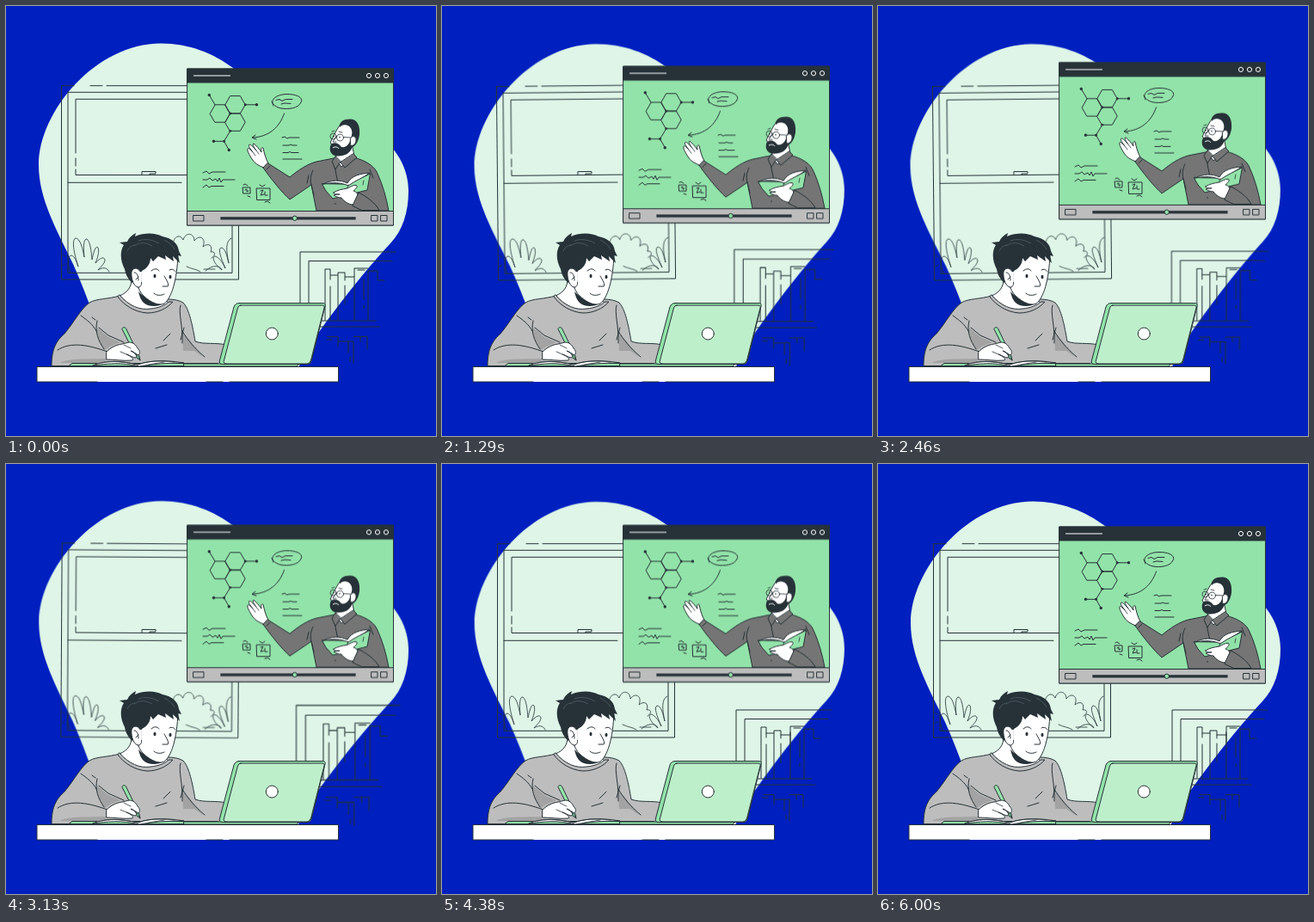
Animation of 500x500 px, one loop 6.04 s. Source, as an HTML page:

```html
<!DOCTYPE html>
<html lang="en">
<head>
<meta charset="utf-8">
<title>Online lesson</title>
<style>
  html, body { margin: 0; width: 100%; height: 100%; overflow: hidden; background: #001fbf; }
  svg { display: block; width: 100vw; height: 100vh; }
  .line { fill: none; stroke: #263238; stroke-width: 1; stroke-linecap: round; stroke-linejoin: round; }
  .thin { stroke-width: .8; }
  .ink { stroke: #263238; stroke-width: 1; stroke-linejoin: round; stroke-linecap: round; }
  .dark { fill: #263238; }
  .white { fill: #fff; }
  .green { fill: #92e3a9; }
  .pale { fill: #beefcb; }
  .grey { fill: #bdbdbd; }
  .shade { fill: #a3a3a3; }
  .suit { fill: #757575; }

  #blob, #window, #shelf, #screen { animation: 6040ms linear infinite; }
  #blob { transform-origin: 253px 230px; animation-name: sway; }
  #window { transform-origin: 168px 206px; animation-name: settle; }
  #shelf { transform-origin: 395px 350px; animation-name: beat; }
  #screen { animation-name: float; }

  /* 1.5 s cycles inside the 6.04 s loop */
  @keyframes float {
    0%, 24.834%, 49.669%, 74.503%, 99.338%, 100% { transform: translateY(0); }
    12.417%, 37.252%, 62.086%, 86.921% { transform: translateY(-10px); }
  }
  @keyframes sway {
    0%, 99.338%, 100% { transform: rotate(0deg); }
    6.209%, 31.043%, 55.877%, 80.712% { transform: rotate(1deg); }
    18.626%, 43.461%, 68.295%, 93.129% { transform: rotate(-1deg); }
  }
  @keyframes settle {
    0%, 57%, 100% { transform: rotate(0deg); }
    6.209%, 31.043% { transform: rotate(1deg); }
    18.626%, 43.461% { transform: rotate(-1deg); }
    51.82% { transform: rotate(.35deg); }
  }
  @keyframes beat {
    0%, 49.67%, 57%, 100% { transform: scale(1); }
    2.48% { transform: scale(1.1); }
    11.09% { transform: scale(1.075); }
    21.36% { transform: scale(1.042); }
    31.79% { transform: scale(1.02); }
    40.73% { transform: scale(1.012); }
    51.82% { transform: scale(1.085); }
    52.5% { transform: scale(1.07); }
  }
</style>
</head>
<body>
<svg viewBox="0 0 500 500">
  <defs>
    <path id="hex" class="line" d="M-11.7 0L-5.85 -10.2H5.85L11.7 0L5.85 10.2H-5.85Z"/>
  </defs>

  <path id="blob" fill="#def5e7" d="M180 43.500C213 43.500 241 55 264 72C318 108 385 125 425 146C455 162 468 190 468 215C468 240 461 261 447 276C422 303 398 332 361 383L340 420H122C110 382 95 338 78 300C60 262 38 225 38 185C38 123 104 43.500 180 43.500Z"/>

  <g id="window" class="line">
    <path d="M64.5 92.700H79M98 92.700H112M117 92.700H240M64.5 92.700V318H270.500V200M72 100.300H262M72 100.300V310.300H263V200M72 205.300H204M220 196.500H81V190M81 186V177M81 171V108.300H240M158 196V192.500H174V195H167V196"/>
    <path class="thin" d="M75 310C71 300 72 290 76 290C80 291 82 297 84 303C79 288 76 271 81 270C86 270 89 281 91 292C90 281 90 270 94 271C98 274 99 284 100 295C102 286 104 278 107 281C109 286 106 294 104 299C109 293 114 291 115 295C115 300 109 304 107 307C112 304 117 303 120 309M66 289L69 291M66 302L69 300"/>
    <path class="thin" d="M194 277C195 267 203 265 206 272C209 262 219 264 219 273C225 265 233 270 229 280C235 275 241 278 238 286C244 285 244 290 239 293M232 308C240 300 250 302 251 307C244 302 238 292 243 291C248 292 253 300 255 305C250 293 246 283 250 281C255 281 257 291 259 299C256 285 255 273 262 270M230 306H243M210 303C216 306 222 306 226 309"/>
  </g>

  <g id="shelf" class="line">
    <path d="M342 356V286H453M352 356V296.500H449M364 366H430M360 373H434"/>
    <path d="M371 365V306H377V318M377 326V365M377 313H386M386 365V310H394V319M394 325V347M394 315H405M405 365V305H421M405 312V326M409 307H417M421 365V308H432V318M426 308V309M432 319H440M416 318V341M416 348V352"/>
    <path d="M374 384.500H386V396M386 390H398V403M398 390H404V415M404 384.500H420V399M412 384V390M373 388H379M400 408V413"/>
  </g>

  <g id="screen">
    <rect class="ink green" x="211" y="73" width="239.500" height="182"/>
    <path class="ink dark" d="M211 73H450.500V89H211Z"/>
    <path d="M218 81H261" stroke="#fff" stroke-width="1.200"/>
    <g fill="none" stroke="#fff">
      <circle cx="422" cy="81" r="2.600"/><circle cx="432" cy="81" r="2.600"/><circle cx="442" cy="81" r="2.600"/>
    </g>

    <g class="line">
      <use href="#hex" x="249" y="125"/><use href="#hex" x="266.500" y="114.800"/><use href="#hex" x="266.500" y="135.100"/>
      <path d="M278.200 114.800H291.500M243 114.800L236.300 103.500M260.800 145.300L253.500 157.300H241.500M253.500 157.300L259.300 167.500"/>
      <path d="M311 116C306 108 316 102.500 327 102.500C339 102.500 346 107 343 112C340 119 328 120.500 320 119C314 118 310 114 309 111M314 109.500L318 108.500L321 110.500L325 108.500L333 108.500M320 114L324 113L331 113.500"/>
      <path d="M323.500 125C318 141 306 152 287 153M290 150L286 153L291 155"/>
      <path d="M321 153L324 152L327 154L329 153H341M322 162H329L331 161L333 162H338M322 170.500H328L330 169.500L332 170.500H340M322 178H344"/>
      <path d="M229 194L233 192L236 195L240 193H255M229 202H234L237 200L240 203L244 201L246 204L248 200L250 205L252 202H266M229 211L233 208L236 211L239 209.500H253"/>
      <path d="M275.500 211H284V218H276ZM278 214L280 213V216L282 215M276 208L278 207L281 209M281 221L284 222M291.500 212H307V225.500H292ZM296 215L299 214L296 220L300 219M301 216V220H304M295 208L298 210L301 208M301 228L304 227L307 229"/>
    </g>
    <g class="dark">
      <circle cx="278.200" cy="114.800" r="1.500"/><circle cx="291.500" cy="114.800" r="1.700"/><circle cx="236.300" cy="103.500" r="1.700"/>
      <circle cx="260.800" cy="125" r="1.400"/><circle cx="260.800" cy="145.300" r="1.400"/><circle cx="253.500" cy="157.300" r="1.500"/><circle cx="241.500" cy="157.300" r="1.700"/><circle cx="259.300" cy="167.500" r="1.700"/>
    </g>

    <g id="teacher">
      <path class="ink white" d="M300 188C294 186 289 183 286 178C283 173 280 168 281 166C282 164 285 168 287 170C284 166 281 162 283 161C285 161 288 165 291 168C288 164 286 160 288 160C291 162 295 167 297 170C296 166 297 164 299 165C300 170 302 178 305 183Z"/>
      <path class="line thin" d="M287 170L290 174M291 168L294 172"/>
      <path class="ink suit" d="M299 188L304 182.500L330 199C341 190 350 184 361 181L381 177L404 176C420 180 429 187 432 195C438 208 442 222 445 238H361L355 208L330 225C321 217 308 201 299 188Z"/>
      <path class="line" d="M355 208C353 201 355 195 357 191M355 208L358 220M352 197L350 206M423 190L427 200M382 186L386 206M303 190L307 186"/>
      <path class="ink white" d="M386 168L383 177L390 187L405 174L402 160Z"/>
      <path class="ink suit" d="M383 175L379 181L383 190L389 181ZM389 182L394 188L408 176L404 172Z"/>
      <path class="ink white" d="M390 136C386 141 383 147 380 153L377 159L381 162L386 172L400 168L408 154L405 138Z"/>
      <path class="dark" d="M388 141C387 134 394 131 401 131.500C409 132 412 140 411 150C410 155 409 158 406 162L402 165C400 171 394 175 385 174.500C377 174 375 166 378 160.500C382 158 387 159 390 164C396 165 400 160 401 153C404 147 402 140 396 138.500C392 137.500 390 139 388 141Z"/>
      <path class="ink white" d="M400.500 154C402 150 408 151 407 157C406 162 401 164 400.500 161Z"/>
      <path d="M380 165C383 163 386 164 387 166" stroke="#fff" fill="none"/>
      <g class="line thin"><circle cx="380.500" cy="151.500" r="3.500"/><circle cx="388.500" cy="153" r="4"/><path d="M392.500 152.500L401 153M384 152H384.500M379 146L382 145M387 146L391 147M383 153L380 158H384"/></g>
      <g class="dark"><circle cx="381" cy="151.500" r=".8"/><circle cx="388" cy="152.500" r=".8"/></g>

      <path class="ink green" d="M367.500 207L372 215L380 224L400 219L420 214L423.500 195L398 207Z"/>
      <path class="ink white" d="M369 207C378 202 389 202 397 206C402 197 412 195 423 194C415 200 406 203 398 209C390 205 380 205 369 207Z"/>
      <path class="line thin" d="M398 208L396 214M416 203L415 208"/>
      <path class="ink white" d="M381 217C385 214 391 213 397 212C401 210 406 207 408 209C409 211 405 214 404 215C408 216 411 220 409 226L404 231C398 231 393 227 390 223C386 223 383 221 381 220C383 219 386 219 388 219C385 219 381 219 381 217Z"/>
      <path class="ink suit" d="M403 232L410 217C418 221 429 228 434 237.500H414Z"/>
      <circle class="dark" cx="383" cy="230" r=".8"/>
    </g>

    <g class="ink">
      <rect class="grey" x="211" y="238.500" width="239.500" height="16.500"/>
      <path fill="none" d="M218 243.500H230V250H218ZM425 243.500H432V250H425ZM436 243.500H443V250H436Z"/>
      <path d="M251 246.800H405" stroke-width="3.300" stroke-linecap="square"/>
      <circle class="green" cx="335.800" cy="246.800" r="2.700"/>
    </g>
  </g>

  <g id="student">
    <path class="ink grey" d="M132 337C119 341 105 340 97 345C87 352 79 368 68 381C59 389 53 398 53 418.500H250L256 394C244 391 231 394 220 390C217 372 213 352 206 345C201 342 195 341 188 341Z"/>
    <path class="shade" d="M106 374C105 383 109 393 115 400L121 396L133 391L119 385ZM205 380L206 401H219L229 408L212 387ZM64 414C78 409 98 411 116 410L115 415H64Z"/>
    <path class="line" d="M106 366C103 378 107 389 114 399M87 360C94 365 101 370 105 378M108 374L119 383L137 391M203 348C200 356 206 373 205 392M205 378C211 388 219 398 231 408M60 400C75 390 96 394 118 402M191 381L183 389M174 398L187 394M203 388L207 374M100 362L104 365"/>
    <path class="ink white" d="M146 318C146 326 142 333 132 337C140 348 152 355 166 355C177 354 186 350 190 346L178 336Z"/>
    <path class="ink grey" d="M132 336C143 349 156 354 168 352C178 351 185 348 189 344L194 344C187 352 176 357 164 357C150 356 137 348 130 338Z"/>
    <path class="dark" d="M154 332C161 340 174 345 183 346C177 350 165 350 160 345C156 341 155 336 154 332Z"/>
    <path class="ink white" d="M150 296C149 315 152 330 161 338C169 345 178 349 184 346C192 340 199 320 200 288L180 278Z"/>
    <path class="dark" d="M147 322C142 318 139 312 138 306C133 297 132 285 137 278L132 275L141 274C143 269 147 266 151 264L150 268C162 263 174 264 182 268C193 270 200 276 201 285L204 291L200 290L202 299L194 291L195 297L185 290L186 295L177 291L171 297L168 293C168 300 164 305 158 308L156 314Z"/>
    <path d="M154 273C162 270 171 272 178 276M149 279C156 274 163 275 170 279M141 285C143 280 147 278 150 278M184 272C190 275 194 279 196 283" fill="none" stroke="#607077" stroke-width=".6"/>
    <path class="ink white" d="M157 311C155 304 148 303 146 309C145 317 149 328 155 327C158 325 158 322 157 319Z"/>
    <path d="M156.500 309V321" stroke="#fff" stroke-width="2.500"/>
    <path class="line" d="M149 310C152 309 154 314 154 319M151 318L154 315M184 314C187 319 190 324 188 326L182 326M172 334C175 337 180 337 184 335M169 308C172 305 176 305 178 308M190 307C193 305 196 307 197 309"/>
    <g class="dark"><ellipse cx="173" cy="314" rx="1.500" ry="2.300"/><ellipse cx="191" cy="315" rx="1.500" ry="2.300"/></g>
  </g>

  <g id="notebook" class="ink">
    <path class="green" d="M73 418.500L77 415.500H246L250 418.500Z"/>
    <path class="white" d="M101 418C114 412 132 412 153 417C170 411 188 412 207 415C190 415 171 416 155 419C135 414 117 416 101 418Z"/>
    <path class="line thin" d="M111 415C124 412 140 414 153 417C164 413 178 412 196 414M166 417L184 414"/>
    <path class="green" d="M135 375C136 373 139 373 140 376L155 407L156 412L152 409Z"/>
    <path class="white" d="M117 402C122 397 128 394 135 393L143 391C148 391 151 394 153 398C156 401 156 404 154 406C151 405 149 402 145 401C150 403 153 407 151 409C147 409 144 406 140 405C145 407 149 410 147 412C136 413 126 411 117 411Z"/>
    <path class="line thin" d="M137 394L145 398M133 402L140 405M151 404L156 412"/>
  </g>

  <g id="laptop" class="ink">
    <path class="green" d="M207 416H341L338 419H207Z"/>
    <path class="green" d="M271 345.500H368Q372 345.500 371 349L355 413Q354 416.500 350 416.500H252Q247 416.500 248.500 412L265 350Q266.500 345.500 271 345.500Z"/>
    <path class="pale" d="M273 348H367Q371 348 370 351L354.500 412Q353 416 350 416H257Q252 416 253.500 412L269.500 351Q270.500 348 273 348Z"/>
    <circle class="white" cx="309.300" cy="381" r="7"/>
  </g>

  <path class="white" d="M36 419.500H386.500V437H36Z"/>
  <path class="line" d="M106 437H36V419.500H386.500V437H260M233 437H252"/>
</svg>
</body>
</html>
```
